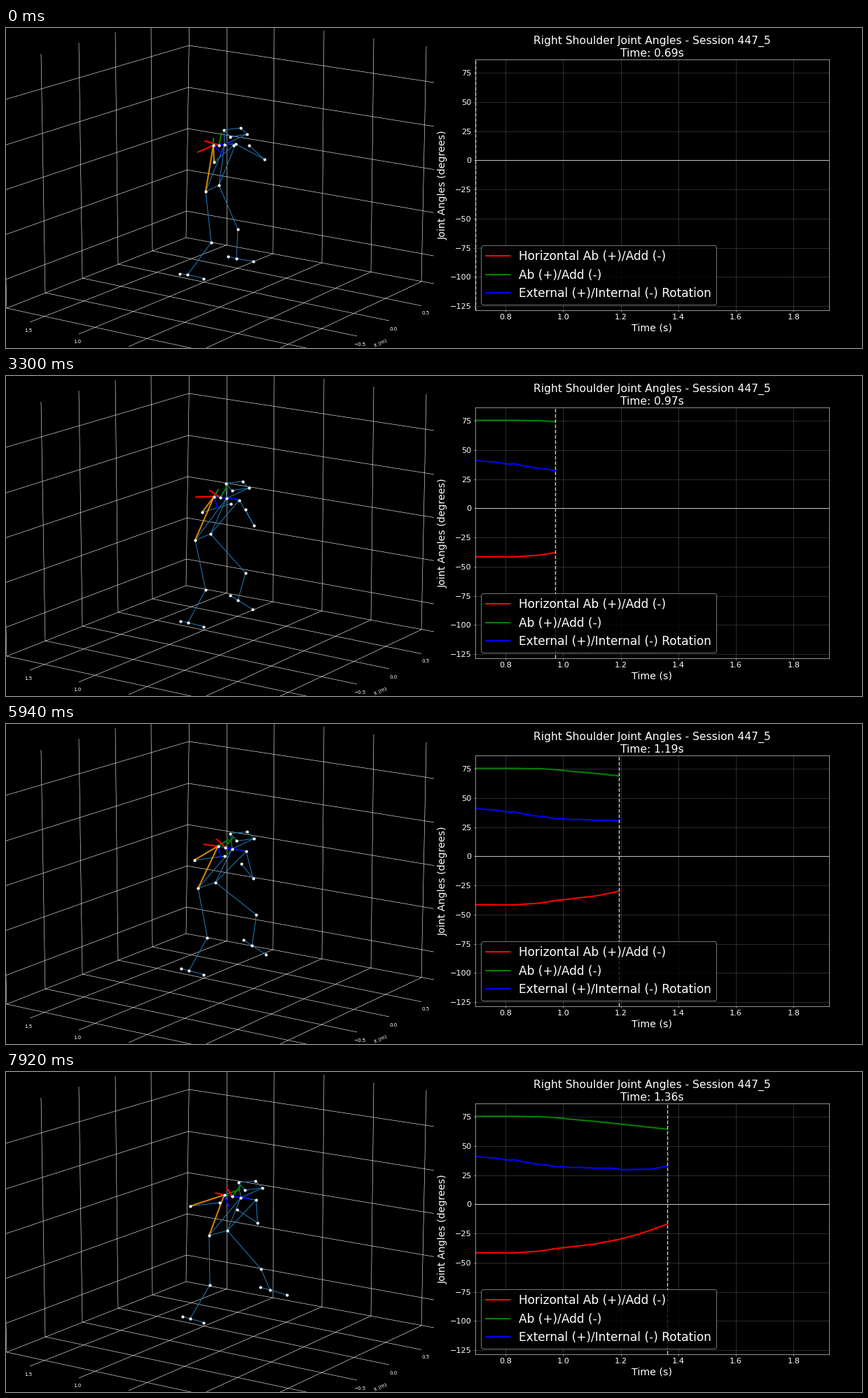
Animation, 1222 px wide and 458 px high, one loop 8000 ms. Source, as a matplotlib script:

```python
import numpy as np
import matplotlib.pyplot as plt
from matplotlib.animation import FuncAnimation
from matplotlib.collections import LineCollection

W, H, DPI = 1222, 458, 64
LOOP, INTERVAL, STEP = 8000, 50, 330   # milliseconds
LAST = LOOP // STEP
S = W / 24 / DPI                       # layout is designed for a 24 inch wide figure

plt.style.use("dark_background")
plt.rcParams.update({
    "font.family": "DejaVu Sans",
    "axes.linewidth": 0.8 * S, "grid.linewidth": 0.8 * S, "patch.linewidth": S,
    "axes.labelpad": 4 * S, "axes.labelsize": 20 * S, "legend.fontsize": 24 * S,
})
for axis in ("xtick", "ytick"):
    plt.rcParams.update({f"{axis}.major.size": 3.5 * S, f"{axis}.major.pad": 3.5 * S,
                         f"{axis}.major.width": 0.8 * S, f"{axis}.labelsize": 16 * S})

# Joint paths in pixels: x values, then y values, at the steps in KNOTS
KNOTS = np.array([0, 3, 7, 10, 15, 20, 24])
TRUNK = {
    "head": ([311, 312, 312.5, 313.5, 317, 323.5, 332], [146, 148, 151, 153.5, 156, 157, 158]),
    "r_sho": ([296, 296, 296, 297, 300, 305, 311.5], [168, 169, 171, 172.5, 174.5, 175, 176]),
    "neck": ([312, 313, 313, 315, 319.5, 326, 335], [167, 168, 172, 175, 178, 179, 180]),
    "l_sho": ([328, 329, 330.5, 333, 338, 347, 357], [166, 168, 173, 177.5, 181, 183, 183]),
    "r_hip": ([285, 280, 273, 270, 271, 278, 290], [234, 234, 234, 235, 235, 235, 234]),
    "l_hip": ([304, 300, 294, 292, 295, 303, 316], [225, 226, 226, 226, 226, 227, 227]),
}
ARMS = {
    "r_elb": ([297, 293, 286, 280, 273, 266, 263], [192, 192.5, 193.5, 195, 196, 194, 192]),
    "r_wri": ([325, 325, 323.5, 321, 316, 310, 305], [168, 172, 178, 183, 188, 189, 187]),
    "l_elb": ([369, 366, 359, 354, 352, 354, 359], [188, 195, 207, 214, 220, 220, 216]),
    "l_wri": ([347, 348, 345, 341.5, 338, 334, 330], [168, 174, 184, 191, 199, 200, 197]),
}
LEGS = {
    "r_kne": ([293, 291, 287, 285, 287, 288, 291], [307, 306, 306, 306, 305, 306, 305]),
    "l_kne": ([331, 331, 337, 342, 351, 361, 364], [288, 288, 286, 282, 273, 275, 282]),
    "l_ank": ([329, 329.5, 334, 331, 336, 362, 377], [330, 328, 324, 321, 318, 316, 312]),
    "l_heel": ([317, 318, 322, 320, 326, 349, 363], [327, 325, 318.5, 314, 310, 309, 308]),
    "l_toe": ([353, 354.5, 357, 352, 356, 383, 401], [334, 335, 336, 334, 333, 327, 319]),
}
PATHS = {**TRUNK, **ARMS, **LEGS}

BONES = [pair.split("-") for pair in (
    "head-h1 h1-h2 h2-h3 h3-head head-neck h2-neck r_sho-mid mid-neck neck-l_sho "
    "neck-r_hip neck-l_hip l_sho-l_hip r_hip-l_hip r_elb-r_wri l_sho-l_elb l_elb-l_wri "
    "r_hip-r_kne r_kne-r_ank r_ank-r_heel r_ank-r_toe "
    "l_hip-l_kne l_kne-l_ank l_ank-l_heel l_ank-l_toe").split()]
ARM_BONES = [("r_sho", "r_elb"), ("r_sho", "r_hip")]

# Axis tips relative to their joint, at the steps in TIP_KNOTS
TIP_KNOTS = np.array([0, 7, 15, 24])
TIPS = [
    ("r_sho", "red", [-23, -27, -24, -13], [10, 3, -2, -3]),
    ("r_sho", "green", [0, 4, 12, 23], [-11, -11, -10, -8]),
    ("r_sho", "blue", [13, 7, 3, 7], [13, 16, 17, 17]),
    ("mid", "red", [-21, -17, -14, -9], [-6, -9, -12, -13]),
    ("mid", "green", [4, 10, 12, 12], [-18, -19, -16, -16]),
    ("mid", "blue", [21, 24, 25, 24], [-3, 1, 4, 3]),
]

# Angle curves: steps, then degrees
CURVES = [
    ("red", "Horizontal Ab (+)/Add (-)",
     [0, 3, 5, 7, 8, 10, 12, 15, 18, 20, 22, 24],
     [-41.5, -41.6, -41.6, -40.6, -40.2, -38, -36.4, -34, -30, -26.5, -22, -17]),
    ("green", "Ab (+)/Add (-)",
     [0, 5, 7, 8, 10, 12, 15, 18, 20, 24],
     [75.5, 75.5, 75.2, 75.3, 74.4, 73, 71.2, 69, 67.5, 64.5]),
    ("blue", "External (+)/Internal (-) Rotation",
     [0, 1, 2, 3, 4, 5, 6, 7, 8, 9, 10, 11, 12, 13, 15, 17, 18, 18.3, 20, 22, 23, 24],
     [41.5, 40.3, 40, 39.2, 38, 38.2, 36.4, 35.3, 34.2, 33.7, 32.2, 32.3,
      31.5, 31.8, 31, 31, 30.4, 29.7, 30, 30.2, 31.5, 33]),
]


def hermite(knots, values, s):
    """Smooth curve through values at knots."""
    values = np.asarray(values, float)
    slopes = np.gradient(values, knots)
    i = min(np.searchsorted(knots, s, side="right") - 1, len(knots) - 2)
    h = knots[i + 1] - knots[i]
    u = (s - knots[i]) / h
    return ((1 + 2 * u) * (1 - u) ** 2 * values[i] + u * (1 - u) ** 2 * h * slopes[i]
            + u * u * (3 - 2 * u) * values[i + 1] + u * u * (u - 1) * h * slopes[i + 1])


def point(knots, xs, ys, s):
    return np.array([hermite(knots, xs, s), hermite(knots, ys, s)])


def pose(s):
    j = {name: point(KNOTS, xs, ys, s) for name, (xs, ys) in PATHS.items()}
    u = s / LAST
    j["h1"] = j["head"] + (24, -3 + u)
    j["h2"] = j["head"] + (33 + u, 6 + 2 * u)
    j["h3"] = j["head"] + (9, 10 + u)
    j["mid"] = (j["r_sho"] + j["neck"]) / 2
    j["r_ank"] = np.array([259.3 + 3.5 * u ** 2, 353])
    j["r_heel"] = np.array([248 + 4 * u ** 2, 351.5 - 1.5 * u])
    j["r_toe"] = np.array([282, 358.5])
    return j


def time_at(s):
    return (25 + s) / 36


fig = plt.figure(figsize=(W / DPI, H / DPI), dpi=DPI, facecolor="black")

# Left: the 3D scene, projected to pixels
scene = fig.add_axes([0, 0, 0.5, 1])
scene.set(xlim=(0, W / 2), ylim=(H, 0))
scene.axis("off")

left_wall = [((-8, 53), (1, 401)), ((50, 37), (56, 379)), ((104, 21), (109, 358)),
             ((156, 6), (160, 338)), ((207, -9), (209, 319)), ((262, -25), (257, 300))]
right_wall = [((315, -17), (315, 310.5)), ((383, -7), (381, 323)), ((454, 4), (451, 336)),
              ((525, 15), (521, 349)), ((600, 26), (593, 363))]
floor_right = [(310, 468), (452, 463), (501, 441), (547, 419), (593, 397.5), (611, 366)]
floor_left = [(34, 421), (104, 438), (175, 456), (260, 470), (345, 480)]

grid = left_wall + right_wall
grid += [(wall[1], end) for wall, end in zip(left_wall, floor_right)]
grid += [(wall[1], end) for wall, end in zip(right_wall, floor_left)]
grid.append(((257, 300), (1, 401)))
for y in (25, 85, 144, 203, 262):
    corner = (261.2 - (y - 25) * 0.0153, y)
    grid.append((corner, (0, 102 + 1.087 * (y - 25))))
    grid.append((corner, (611, 78 + 1.047 * (y - 25))))
scene.add_collection(LineCollection(grid, colors="white", linewidths=0.8 * S))

for x, y, label, angle in [(32, 433, "1.5", 0), (102, 449, "1.0", 0), (599, 408, "0.5", 0),
                           (553, 431, "0.0", 0), (505, 453, "\u22120.5", 0),
                           (534, 451, "X (m)", 24.8)]:
    scene.text(x, y, label, size=10 * S, rotation=angle, ha="center", va="center")

bones = LineCollection([], colors="tab:blue", linewidths=1.5 * S, zorder=3)
arm = LineCollection([], colors="orange", linewidths=3 * S, alpha=0.8, zorder=3.5)
axes_lines = LineCollection([], colors=[tip[1] for tip in TIPS], linewidths=3 * S, zorder=4)
for lines in (bones, arm, axes_lines):
    scene.add_collection(lines)
joints, = scene.plot([], [], "o", color="white", ms=4.2 * 72 / DPI, mew=0, zorder=5)

# Right: the angle chart
left, right, top, bottom = 669.7, 1174.5, 45.3, 404.3
chart = fig.add_axes([left / W, 1 - bottom / H, (right - left) / W, (bottom - top) / H])
chart.set(xlim=(time_at(0), 1.922), ylim=(-128.8, 86.4),
          xticks=np.arange(0.8, 1.9, 0.2), yticks=np.arange(-125, 76, 25),
          xlabel="Time (s)", ylabel="Joint Angles (degrees)")
chart.grid(alpha=0.3)
chart.axhline(0, color="white", lw=S)
curves = [chart.plot([], [], color=color, lw=3 * S, label=label)[0]
          for color, label, *_ in CURVES]
cursor = chart.axvline(time_at(0), color="white", ls="--", lw=2 * S, alpha=0.8)
chart.legend(loc="lower left")
title = chart.set_title("", size=22 * S, pad=6 * S)


def update(frame):
    s = min((frame * INTERVAL + INTERVAL - 1) // STEP, LAST)
    j = pose(s)
    bones.set_segments([(j[a], j[b]) for a, b in BONES])
    arm.set_segments([(j[a], j[b]) for a, b in ARM_BONES])
    axes_lines.set_segments([(j[name], j[name] + point(TIP_KNOTS, xs, ys, s))
                             for name, _, xs, ys in TIPS])
    joints.set_data(*np.array(list(j.values())).T)

    for line, (_, _, knots, angles) in zip(curves, CURVES):
        steps = np.union1d(np.arange(s + 1), [k for k in knots if k <= s])
        line.set_data(time_at(steps), np.interp(steps, knots, angles))
    cursor.set_xdata([time_at(s)] * 2)
    title.set_text(f"Right Shoulder Joint Angles - Session 447_5\nTime: {time_at(s):.2f}s")
    return bones, arm, axes_lines, joints, *curves, cursor, title


anim = FuncAnimation(fig, update, frames=LOOP // INTERVAL, interval=INTERVAL,
                     repeat=True, repeat_delay=0)
plt.show()
```
